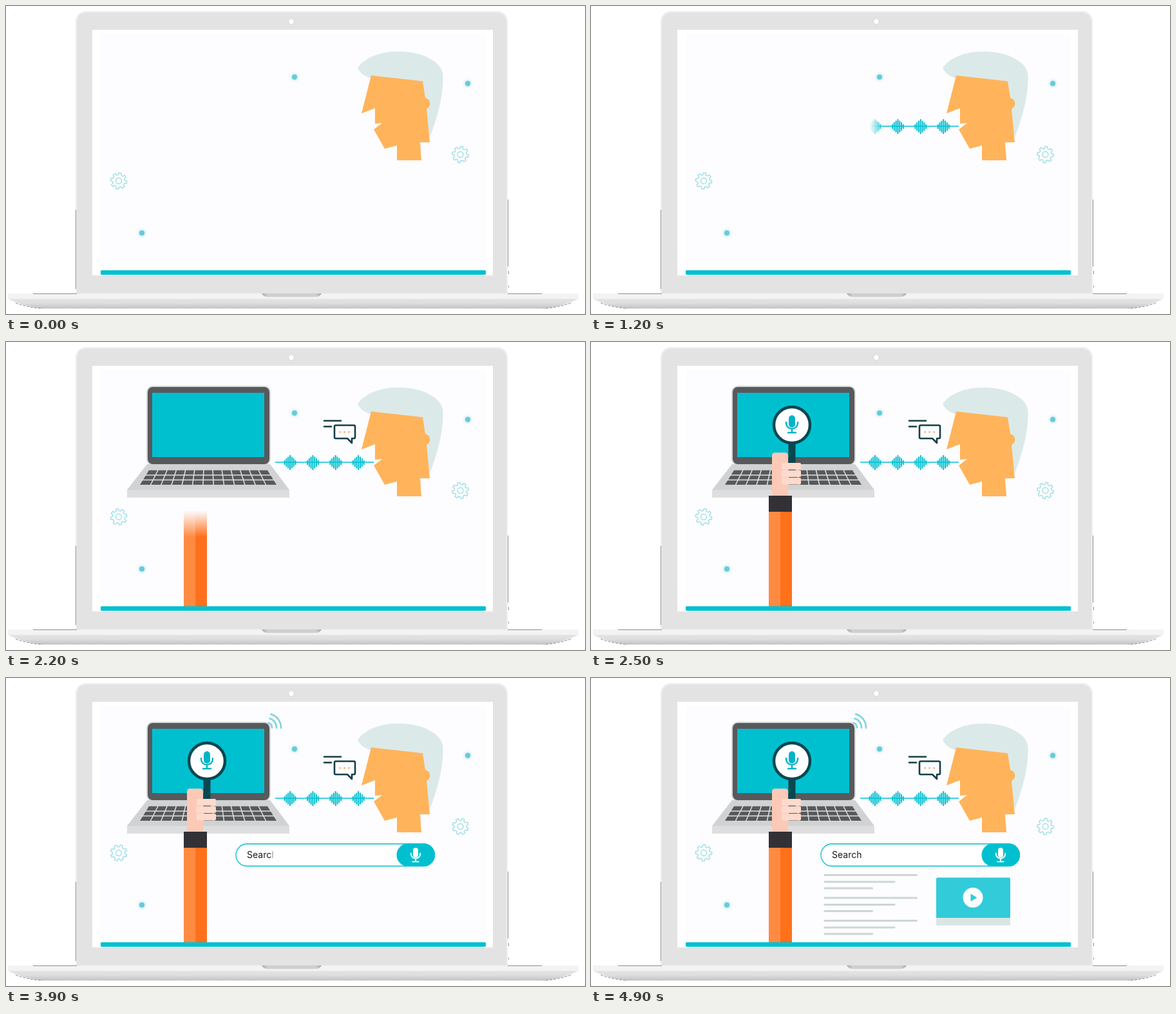
Animation, 899 px wide and 479 px high, one loop 9.9 s. Source, as an HTML page:

```html
<!DOCTYPE html>
<html lang="en">
<head>
<meta charset="utf-8">
<title>Voice search</title>
<style>
  html, body { margin: 0; width: 100%; height: 100%; overflow: hidden; background: #fff; }
  svg { display: block; width: 100%; height: 100%; }
  text { font: 14px Inter, "Open Sans", sans-serif; fill: #1c1c1c; }
</style>
</head>
<body>
<svg viewBox="0 0 899 479" xmlns="http://www.w3.org/2000/svg">
  <defs>
    <linearGradient id="base" x2="0" y2="1">
      <stop offset="0" stop-color="#e4e4e4"/><stop offset=".45" stop-color="#dedede"/><stop offset="1" stop-color="#c2c2c4"/>
    </linearGradient>
    <linearGradient id="notchShade">
      <stop offset="0" stop-color="#aaa"/><stop offset=".1" stop-color="#cfcfd1"/>
      <stop offset=".9" stop-color="#cfcfd1"/><stop offset="1" stop-color="#aaa"/>
    </linearGradient>
    <radialGradient id="glow">
      <stop offset=".3" stop-color="#bdeaf0"/><stop offset="1" stop-color="#fff" stop-opacity="0"/>
    </radialGradient>
    <g id="dot"><circle r="10" fill="url(#glow)"/><circle r="4" fill="#67cad8"/></g>
    <g id="mic">
      <rect x="-5" y="-15" width="10" height="19" rx="5" fill="currentColor"/>
      <path d="M-9-4v1a9 9 0 0 0 18 0v-1M0 6v6M-6 12H6" fill="none" stroke="currentColor" stroke-width="2.4" stroke-linecap="round"/>
    </g>
    <g id="paragraph" stroke="#ccd6d5" stroke-width="3.2" stroke-linecap="round">
      <path d="M363 306.5H505.500M363 317H471M363 327H436.500"/>
    </g>
  </defs>

  <!-- outer computer -->
  <path d="M108 447V27Q108 8 127 8H760Q779 8 779 27V447Z" fill="#e3e3e3"/>
  <path d="M109 446V27Q109 9 127 9H760Q778 9 778 27V446" fill="none" stroke="#eee" stroke-width="2"/>
  <path d="M108.500 317V440M779.500 301V405M780.500 412v5M780.500 435v3" stroke="#777" stroke-width=".8"/>
  <rect x="134" y="37" width="622" height="382" fill="#fff"/>
  <rect x="147" y="43" width="598" height="368" fill="#fdfcfe"/>
  <circle cx="443" cy="24" r="4.500" fill="#fff" stroke="#d4d4d4"/>
  <path d="M3 455H889Q868 467 835 470.500H57Q24 467 3 455Z" fill="url(#base)"/>
  <rect x="3" y="447" width="886" height="8.500" rx="1" fill="#f3f3f3"/>
  <path d="M42 447.500H110M779 447.500H832" stroke="#777" stroke-width=".8"/>
  <path d="M15 462Q34 469 57 470.500M877 462Q858 469 835 470.500" fill="none" stroke="#777" stroke-width=".8" stroke-dasharray="4 2"/>
  <path d="M397 447H490Q488 452.500 478 452.500H409Q399 452.500 397 447Z" fill="url(#notchShade)"/>

  <use href="#dot" x="448" y="110.500"/><use href="#dot" x="717" y="120.500"/><use href="#dot" x="211" y="353"/>
  <g id="gears" fill="none" stroke="#9fdfe6" stroke-width="1.400" stroke-linejoin="round"></g>

  <!-- speaker -->
  <path d="M546 97C553 84 575 72 603 71C642 69 672 84 678 103C681 133 670 174 658 204L640 125L566 112C557 110 550 104 546 97Z" fill="#dbeae9"/>
  <path d="M567 108L647 117L651 143A9 9 0 0 1 653 160L658 212H643L645 240H607V217L588 222L571 192L584 182L573 183V159L552 167Z" fill="#ffb45b"/>

  <g id="wave" stroke="#00c0d0" stroke-width="1.500"></g>

  <g id="bubble" fill="none" stroke="#163f48" stroke-width="2.600" stroke-linecap="round" stroke-linejoin="round">
    <path d="M494 122.500H520M494 131.500H505"/>
    <path d="M512 129.500H540Q542 129.500 542 131.500V148Q542 150 540 150H537V157L530 150H512Q510 150 510 148V131.500Q510 129.500 512 129.500Z"/>
    <path d="M518.500 140h.01M525.500 140h.01M532.500 140h.01" stroke="#f6a45c"/>
  </g>

  <g id="laptop">
    <rect x="218" y="68" width="193" height="124" rx="10" fill="#d6d7d9"/>
    <rect x="220" y="70" width="189" height="120" rx="8" fill="#58595b"/>
    <rect x="227" y="79" width="174" height="100" fill="#00c0d0"/>
    <path d="M219 190H410L440 230H188Z" fill="#d1d2d4"/>
    <rect x="188" y="230" width="252" height="12" fill="#dedede"/>
    <path d="M222 199.500H406L420 222H208Z" fill="#58595b"/>
    <path id="keyGaps" stroke="#e0e1e2" stroke-width="1.500"/>
  </g>

  <g id="arm">
    <rect x="306.500" y="156" width="11" height="50" fill="#0a4750"/>
    <circle cx="312" cy="129" r="28" fill="#fff" stroke="#0a4750" stroke-width="4.500"/>
    <use href="#mic" x="312" y="129" color="#00b4c8"/>
    <path d="M281 240V177Q281 172 286 172H301Q306 172 306 177V240Z" fill="#fcc9b6"/>
    <g fill="#fddacb">
      <rect x="296" y="188" width="30" height="10.500" rx="2"/>
      <rect x="295" y="199.500" width="31" height="10.500" rx="2"/>
      <rect x="296" y="211" width="30" height="10.500" rx="2"/>
    </g>
    <rect x="276" y="239" width="36" height="25" fill="#333136"/>
    <rect x="276" y="264" width="18" height="147" fill="#ff8b43"/>
    <rect x="294" y="264" width="18" height="147" fill="#ff701b"/>
  </g>

  <g id="signal" fill="none" stroke="#7ed5dc" stroke-width="2.600" stroke-linecap="round"></g>

  <g id="searchBar">
    <rect x="357" y="258" width="308.500" height="34.500" rx="17.250" fill="#fff" stroke="#00c0d0" stroke-width="1.300"/>
    <rect x="606.500" y="257.500" width="59.500" height="35.500" rx="17.500" fill="#00c0d0"/>
    <use href="#mic" color="#fff" transform="translate(636 276) scale(.8)"/>
  </g>
  <text id="query" x="374" y="280">Search</text>

  <g id="results">
    <use href="#paragraph"/><use href="#paragraph" y="35.500"/><use href="#paragraph" y="71"/>
  </g>

  <g id="video">
    <rect x="536" y="310.500" width="115" height="74.500" rx="2" fill="#d2e1e0"/>
    <path d="M536 373V312.500Q536 310.500 538 310.500H649Q651 310.500 651 312.500V373Z" fill="#00c0d0"/>
    <circle cx="593" cy="341.500" r="15.500" fill="#fff"/>
    <path d="M589.500 335.500V347.500L599.500 341.500Z" fill="#00c0d0"/>
  </g>

  <rect x="147" y="411" width="598" height="7" rx="1.500" fill="#00c0d0"/>
</svg>

<script>
const LOOP = 9900, STEP = 100, LAST = 4900;
const byId = id => document.getElementById(id);
const clamp = v => Math.max(0, Math.min(1, v));
const polar = (r, a) => `${(r * Math.cos(a)).toFixed(2)} ${(r * Math.sin(a)).toFixed(2)}`;

function add(parent, tag, attributes) {
  const node = document.createElementNS("http://www.w3.org/2000/svg", tag);
  for (const name in attributes) node.setAttribute(name, attributes[name]);
  return parent.appendChild(node);
}

function gearPath() {
  const teeth = 8, pitch = 2 * Math.PI / teeth;
  const corners = [[9.6, -.31], [12.7, -.19], [12.7, .19], [9.6, .31]];
  const points = [];
  for (let i = 0; i < teeth; i++)
    for (const [r, part] of corners) points.push(polar(r, (i + part) * pitch));
  return `M${points.join("L")}Z`;
}

const gears = [[175, 272], [705.5, 231]].map(([x, y]) => {
  const gear = add(add(byId("gears"), "g", { transform: `translate(${x} ${y})` }), "g", {});
  add(gear, "path", { d: gearPath() });
  add(gear, "circle", { r: 4.5 });
  return gear;
});

let wavePath = "M418 187H571", bars = "";
for (let unit = 0; unit < 4; unit++)
  [7, 13, 18, 23, 18, 13, 7].forEach((height, i) => {
    bars += `M${441 + unit * 35.4 + (i - 3) * 2.8} ${187.5 - height / 2}v${height}`;
  });
add(byId("wave"), "path", { d: wavePath });
add(byId("wave"), "path", { d: bars, "stroke-width": 2 });

let gaps = "M215 207H413M211 214.500H417";
for (let i = 1; i < 13; i++) gaps += `M${222 + i * 184 / 13} 199L${208 + i * 212 / 13} 222.500`;
byId("keyGaps").setAttribute("d", gaps);

for (const r of [7.5, 14.5, 21.5])
  add(byId("signal"), "path", {
    d: `M${polar(r, -1.3)}A${r} ${r} 0 0 1 ${polar(r, .03)}`, transform: "translate(405.500 77)"
  });

// Soft-edged reveal that travels from one point to another.
function wipe(id, start, duration, [x0, y0], [x1, y1]) {
  const defs = document.querySelector("defs"), soft = .13;
  const gradient = add(defs, "linearGradient", { id: id + "Fade", gradientUnits: "userSpaceOnUse" });
  add(gradient, "stop", { offset: 0, "stop-color": "#fff" });
  add(gradient, "stop", { offset: 1, "stop-color": "#000" });
  const area = { x: 0, y: 0, width: 899, height: 479 };
  const mask = add(defs, "mask", { id: id + "Mask", maskUnits: "userSpaceOnUse", ...area });
  add(mask, "rect", { ...area, fill: `url(#${id}Fade)` });
  const node = byId(id);
  node.setAttribute("mask", `url(#${id}Mask)`);
  return t => {
    const p = clamp((t - start) / duration), front = p * (1 + soft), back = front - soft;
    node.style.display = p ? "" : "none";
    gradient.setAttribute("x1", x0 + (x1 - x0) * back);
    gradient.setAttribute("y1", y0 + (y1 - y0) * back);
    gradient.setAttribute("x2", x0 + (x1 - x0) * front);
    gradient.setAttribute("y2", y0 + (y1 - y0) * front);
  };
}

const fade = (id, start, duration) => t => byId(id).setAttribute("opacity", clamp((t - start) / duration));

function zoom(t) {
  const p = clamp((t - 1300) / 700);
  byId("laptop").setAttribute("opacity", p);
  byId("laptop").setAttribute("transform", `translate(314 155) scale(${p}) translate(-314 -155)`);
}

const spin = t => gears.forEach(gear => gear.setAttribute("transform", `rotate(${10 + t * .072})`));

const parts = [
  spin,
  wipe("wave", 800, 500, [571, 0], [418, 0]),
  wipe("bubble", 1300, 500, [544, 0], [492, 0]),
  zoom,
  wipe("arm", 1990, 500, [0, 411], [0, 98]),
  wipe("signal", 2490, 520, [0, 53], [0, 80]),
  fade("searchBar", 3000, 500),
  wipe("query", 3500, 500, [374, 0], [421, 0]),
  wipe("results", 4000, 500, [361, 0], [508, 0]),
  fade("video", 4500, 500)
];

const begin = performance.now();
function draw() {
  const elapsed = (performance.now() - begin) % LOOP;
  const t = Math.min(Math.floor(elapsed / STEP) * STEP, LAST);
  for (const part of parts) part(t);
  requestAnimationFrame(draw);
}
draw();
</script>
</body>
</html>
```
